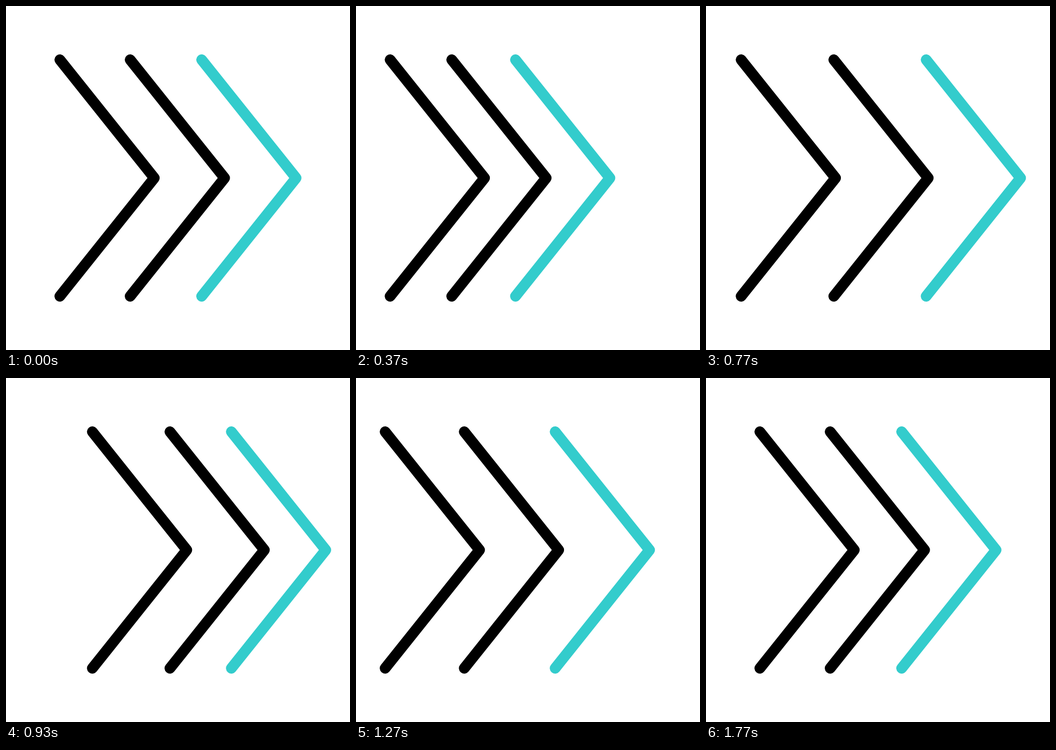
An HTML page that plays this animation: 640 px wide and 640 px high, repeating every 2000 ms.

```html
<!DOCTYPE html>
<html lang="en">
<head>
<meta charset="utf-8">
<title>Swinging chevrons</title>
<style>
  html, body { margin: 0; width: 100%; height: 100%; overflow: hidden; background: #fff; }
  svg { display: block; width: 100%; height: 100%; }
  path { fill: none; stroke: #000; stroke-width: 20; stroke-linecap: round; stroke-linejoin: round; }
  .accent { stroke: #33cccc; }
</style>
</head>
<body>
<svg viewBox="0 0 640 640">
  <path d="M0 100 L175.7 320 L0 540"/>
  <path d="M0 100 L175.7 320 L0 540"/>
  <path class="accent" d="M0 100 L175.7 320 L0 540"/>
</svg>
<script>
  const LOOP = 2000;
  const FPS = 30;

  // Swing: [frame, horizontal offset], eased between neighbours
  const swing = [[0, 0], [15, -81.6], [26, 74], [34, -46], [42, 59], [49, 0]];

  // Rest position and delay in frames; the leading chevron moves first
  const settings = [
    { x: 100.2, delay: 4 },
    { x: 231, delay: 2 },
    { x: 364, delay: 0 }
  ];
  const chevrons = [...document.querySelectorAll('path')]
    .map((el, i) => ({ el, ...settings[i] }));

  const ease = p => p * p * (3 - 2 * p);

  function offsetAt(frame) {
    if (frame <= 0) return 0;
    const next = swing.findIndex(([end]) => frame < end);
    if (next < 0) return 0;
    const [start, from] = swing[next - 1];
    const [end, to] = swing[next];
    return from + (to - from) * ease((frame - start) / (end - start));
  }

  // Poses are held for one frame each, on a clock of 10 ms ticks
  function frameAt(time) {
    const tick = Math.floor((time % LOOP) / 10) * 10;
    return Math.floor((tick + 4) * FPS / 1000);
  }

  function render(time) {
    const frame = frameAt(time);
    for (const { el, x, delay } of chevrons) {
      el.setAttribute('transform', `translate(${x + offsetAt(frame - delay)} 0)`);
    }
  }

  const begin = performance.now();
  function loop(now) {
    render(Math.max(0, now - begin));
    requestAnimationFrame(loop);
  }
  loop(begin);
</script>
</body>
</html>
```
